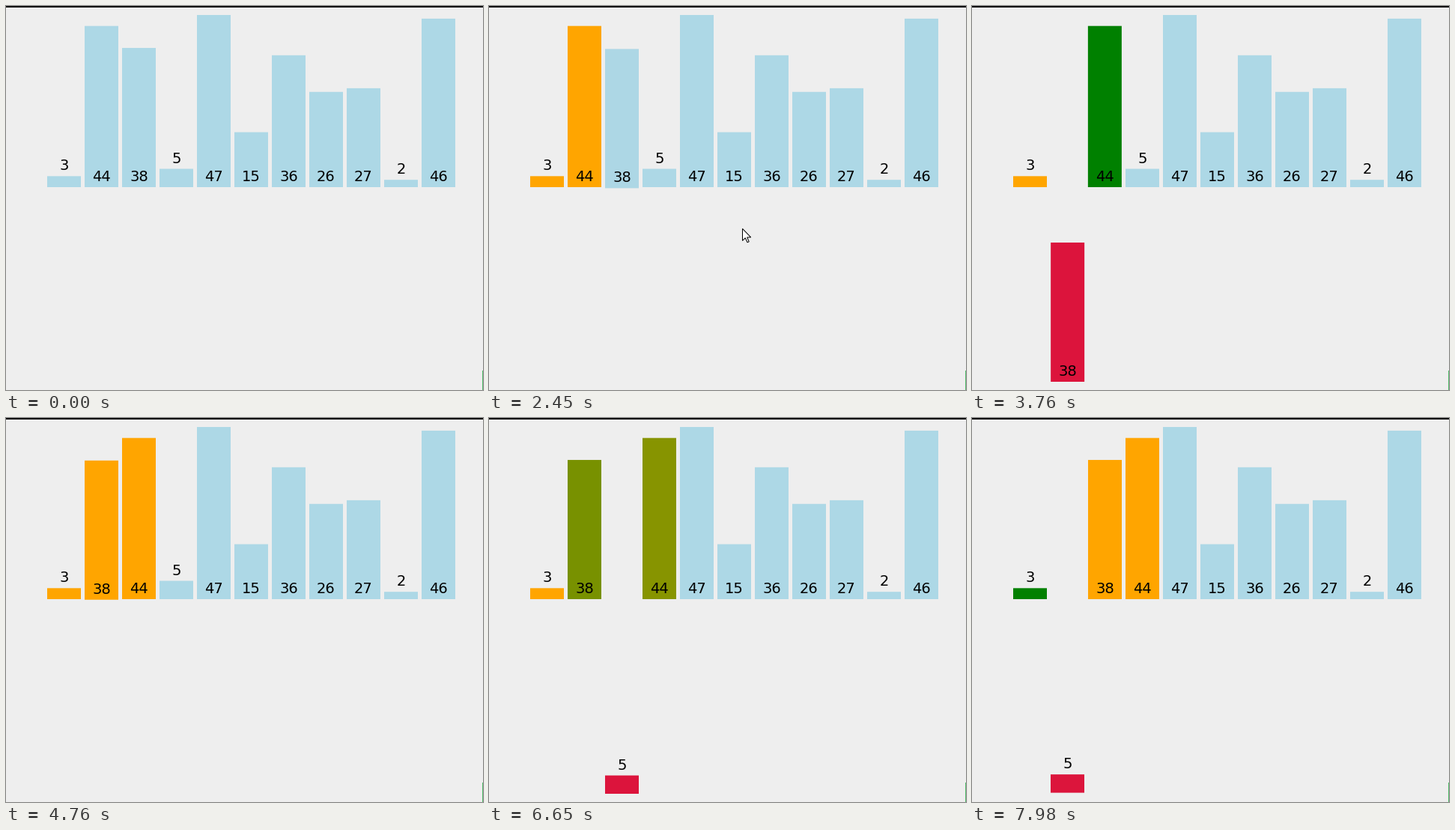
These frames come from a looping animation (637x513 px, 8000 ms). A matplotlib script:

```python
import numpy as np
import matplotlib.pyplot as plt
from matplotlib.animation import FuncAnimation
from matplotlib.colors import to_rgb
from matplotlib.patches import Polygon, Rectangle

W, H, DPI = 637, 513, 100
LOOP, TICK = 8000, 20
FIRST, PERIOD = 450, 500      # start of the first step, time between steps
REFRESH, SAMPLES = 75, 5      # the screen redraws in jumps, so many per step
VALUES = [3, 44, 38, 5, 47, 15, 36, 26, 27, 2, 46]
LEFT, PITCH, BAR_W = 55, 50, 45
BASE, DROP, UNIT = 242, 260, 230 / 47
IDLE, SORTED, PICKED, COMPARED = "lightblue", "orange", "crimson", "green"

ARROW = np.array([(0.5, 0.5), (0.5, 16.5), (4.3, 12.8), (7, 18.8),
                  (9.2, 17.8), (6.7, 12), (11.7, 12)])
CURSOR_SLIDE, CURSOR_END = (590, 830), 3100


def insertion_sort(values):
    """Yield the steps, each {value: (slot, lowered, colour)}."""
    a = list(values)
    yield {a[0]: (0, 0, SORTED)}
    for i in range(1, len(a)):
        key, j = a[i], i
        yield {key: (i, 1, PICKED)}
        released = {}
        while j > 0:
            other = a[j - 1]
            yield {other: (j - 1, 0, COMPARED), **released}
            if other <= key:
                released = {other: (j - 1, 0, SORTED)}
                break
            a[j] = other
            yield {other: (j, 0, COMPARED), key: (j - 1, 1, PICKED)}
            released = {other: (j, 0, SORTED)}
            j -= 1
        a[j] = key
        yield {key: (j, 0, SORTED), **released}


STEPS = list(insertion_sort(VALUES))


def cubic_in_out(u):
    return 4 * u ** 3 if u < 0.5 else 1 - 4 * (1 - u) ** 3


def pose(slot, lowered, colour):
    return np.array([slot, lowered, *to_rgb(colour)], float)


def poses_at(t):
    state = {v: pose(i, 0, IDLE) for i, v in enumerate(VALUES)}
    for k, moves in enumerate(STEPS):
        elapsed = t - FIRST - k * PERIOD
        if elapsed < 0:
            break
        sample = elapsed // REFRESH + 0.55
        p = cubic_in_out(min(1, sample / SAMPLES))
        for value, goal in moves.items():
            state[value] = state[value] + (pose(*goal) - state[value]) * p
    return state


fig = plt.figure(figsize=(W / DPI, H / DPI), dpi=DPI, facecolor="#eeeeee")
ax = fig.add_axes([0, 0, 1, 1])
ax.set(xlim=(0, W), ylim=(H, 0))
ax.axis("off")

ax.add_patch(Rectangle((0, 0), W, 2, color="black", lw=0))
ax.add_patch(Rectangle((636, 487), 1, 26, color="#52bc69", lw=0))

bars, labels = {}, {}
for v in VALUES:
    bars[v] = ax.add_patch(Rectangle((0, 0), BAR_W, v * UNIT, lw=0, snap=False))
    labels[v] = ax.text(0, 0, str(v), family="DejaVu Sans",
                        size=19.5 * 72 / DPI, ha="center", va="baseline", zorder=3)
cursor = ax.add_patch(Polygon(ARROW, fc="white", ec="black", lw=0.72, zorder=4))


def draw(frame):
    t = frame * TICK + TICK / 2
    for v, (slot, lowered, *rgb) in poses_at(t).items():
        x, bottom = LEFT + PITCH * slot, BASE + DROP * lowered
        top = bottom - v * UNIT
        bars[v].set_xy((x, top))
        bars[v].set_facecolor(np.clip(rgb, 0, 1))
        # Short bars carry their number above
        labels[v].set_position((x + BAR_W / 2, (top if v < 10 else bottom) - 8))

    tip = [np.interp(t, CURSOR_SLIDE, ends) for ends in ((376, 338), (341, 297))]
    cursor.set_xy(ARROW + np.round(tip))
    cursor.set_visible(CURSOR_SLIDE[0] <= t < CURSOR_END)
    return [*bars.values(), *labels.values(), cursor]


anim = FuncAnimation(fig, draw, frames=LOOP // TICK, interval=TICK,
                     repeat=True, repeat_delay=0, blit=False)
plt.show()
```
